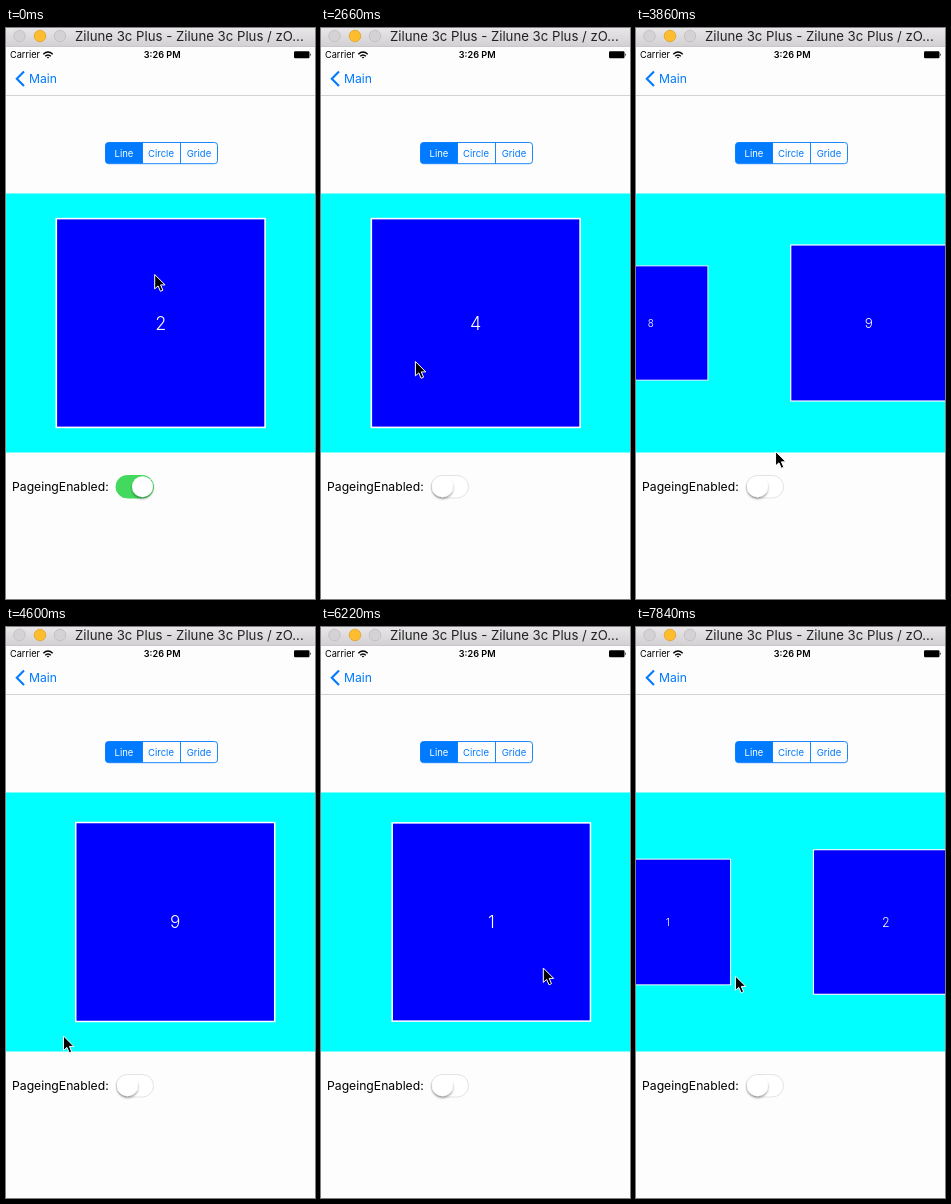
These frames come from a looping animation (309x571 px, 7990 ms). An HTML page:

```html
<!DOCTYPE html>
<html lang="en">
<head>
<meta charset="utf-8">
<title>Carousel</title>
<style>
  html, body { margin: 0; width: 100%; height: 100%; overflow: hidden; background: #fdfdfd; }
  svg { display: block; width: 309px; height: 571px; }
  text { font-family: Inter, Roboto, sans-serif; white-space: pre; }
  .mid { text-anchor: middle; }
  .tint { fill: #007aff; }
  .tint-line { fill: none; stroke: #007aff; }
</style>
</head>
<body>
<svg viewBox="0 0 309 571">
  <defs>
    <linearGradient id="bar" x2="0" y2="1">
      <stop stop-color="#e8e6e8"/><stop offset="1" stop-color="#d2d0d2"/>
    </linearGradient>
    <filter id="shadow" x="-30%" y="-30%" width="160%" height="170%">
      <feDropShadow dx="0" dy="1.8" stdDeviation="1.3" flood-opacity=".38"/>
    </filter>
  </defs>
  <rect width="309" height="571" fill="#fdfdfd"/>

  <!-- Window title bar -->
  <rect width="309" height="18.5" fill="url(#bar)"/>
  <path d="M0 18.5H309" stroke="#bdbbbd" stroke-width=".7"/>
  <g fill="#d4d2d4" stroke="#bfbdbf" stroke-width=".8">
    <circle cx="13.5" cy="8" r="5.8"/>
    <circle cx="34" cy="8" r="5.8" fill="#fdbd2e" stroke="#e0a32b"/>
    <circle cx="54" cy="8" r="5.8"/>
  </g>
  <text x="69" y="13" font-size="13.2" fill="#222">Zilune 3c Plus - Zilune 3c Plus / zO...</text>

  <!-- Status bar -->
  <text x="4" y="30" font-size="9.2">Carrier</text>
  <path d="M37.3 26.2Q42 21.8 46.7 26.2M39.2 28.2Q42 25.6 44.8 28.2" fill="none" stroke="#000" stroke-width="1.4"/>
  <path d="M42 30.5L40.7 29.2Q42 28.2 43.3 29.2Z"/>
  <text class="mid" x="156.2" y="30" font-size="9.1" font-weight="600">3:26 PM</text>
  <rect x="288" y="23.2" width="15.5" height="7" rx="1.2"/>
  <path d="M304.2 25.2Q305.8 26.7 304.2 28.2Z"/>

  <!-- Navigation bar -->
  <path class="tint-line" d="M18 43.5L10.8 50.7L18 57.9" stroke-width="2.1"/>
  <text class="tint" x="23" y="55.2" font-size="12.2">Main</text>
  <path d="M0 67.5H309" stroke="#d2d2d3"/>

  <!-- Segmented control -->
  <path class="tint" d="M136.5 114.5H102.5a3 3 0 0 0-3 3V132.5a3 3 0 0 0 3 3H136.5Z"/>
  <rect class="tint-line" x="99.5" y="114.5" width="112" height="21.2" rx="3" stroke-width=".9"/>
  <path class="tint-line" d="M136.5 114.5V135.5M174.5 114.5V135.5" stroke-width=".9"/>
  <g class="mid" font-size="9.5">
    <text x="118" y="128.7" fill="#fff">Line</text>
    <text class="tint" x="155" y="128.7">Circle</text>
    <text class="tint" x="193" y="128.7">Gride</text>
  </g>

  <!-- Carousel -->
  <rect y="165.5" width="309" height="259" fill="#0ff"/>
  <g id="cards"></g>

  <!-- Switch -->
  <text x="6" y="463.2" font-size="12.2">PageingEnabled:</text>
  <rect id="track" x="110" y="447.5" width="37.5" height="22.5" rx="11.25"/>
  <circle id="knob" cy="458.7" r="10.5" fill="#fff" filter="url(#shadow)"/>

  <path id="cursor" d="M0 0V14.4L3.4 11.4L5.7 16.8L8.2 15.7L5.9 10.4H10.4Z" stroke="#fff"/>
</svg>
<script>
  const LOOP = 7990, STEP = LOOP / 54;
  const CENTER_X = 154.7, CENTER_Y = 295, SPACING = 218, STAGE = 309;
  const $ = id => document.getElementById(id);

  const clamp = u => Math.min(1, Math.max(0, u));
  const smooth = u => clamp(u) ** 2 * (3 - 2 * clamp(u));
  const decay = tau => time => 1 - Math.exp(-Math.max(0, time) / tau);
  const brake = duration => time => 1 - (1 - clamp(time / duration)) ** 2;
  const drag = duration => time => smooth(time / duration);

  // Every gesture adds its distance, in cards, to the scroll position.
  const gestures = [
    { start: 100, distance: 1, ease: decay(206) },
    { start: 650, distance: 1, ease: decay(206) },
    { start: 2687, distance: 5, ease: decay(440) },
    { start: 4810, distance: -8.07, ease: brake(1405) },
    { start: 6215, distance: 0.07, ease: drag(740) },
    { start: 7100, distance: 0.564, ease: drag(740) }
  ];
  const scrollAt = time => gestures.reduce(
    (sum, g) => sum + g.distance * g.ease(time - g.start), 2);

  // Pointer stops: time, x, y.
  const stops = [
    [0, 148.7, 246.5], [1180, 84.5, 318.3], [1920, 126, 457], [2600, 87.5, 332.3],
    [3000, 190, 350], [3400, 85.5, 379.3], [4000, 150, 432], [4580, 57.5, 409],
    [6210, 222.3, 341], [7100, 222.3, 345], [7840, 99.4, 349]
  ];
  function pointerAt(time) {
    const next = stops.findIndex(stop => stop[0] > time);
    if (next < 0) return stops[stops.length - 1].slice(1);
    const [t0, x0, y0] = stops[next - 1], [t1, x1, y1] = stops[next];
    const mix = smooth((time - t0) / (t1 - t0));
    return [x0 + (x1 - x0) * mix, y0 + (y1 - y0) * mix];
  }

  $("cards").innerHTML = Array.from({ length: 9 }, (_, i) => `<g>
    <rect x="-104.4" y="-104.4" width="208.8" height="208.8" fill="#00f" stroke="#fff" stroke-width="1.6"/>
    <text class="mid" y="6.5" font-size="18" font-weight="300" fill="#fff">${i + 1}</text></g>`).join("");
  const cards = [...$("cards").children];

  function render(time) {
    const position = scrollAt(time);
    cards.forEach((card, i) => {
      const offset = (i + 1 - position) * SPACING;
      const scale = Math.max(0, 1 - Math.abs(offset) / STAGE);
      card.setAttribute("transform", `translate(${CENTER_X + offset} ${CENTER_Y}) scale(${scale})`);
    });

    $("cursor").setAttribute("transform", `translate(${pointerAt(time)})`);

    const off = smooth((time - 1900) / 250);
    $("knob").setAttribute("cx", 136.5 - 15 * off);
    $("track").setAttribute("fill", off < 0.5 ? "#43d95e" : "#fff");
    $("track").setAttribute("stroke", off < 0.5 ? "#43d95e" : "#e3e3e3");
  }

  function tick(now) {
    render(Math.floor((now % LOOP + 5) / STEP) * STEP % LOOP);
    requestAnimationFrame(tick);
  }
  tick(performance.now());
</script>
</body>
</html>
```
